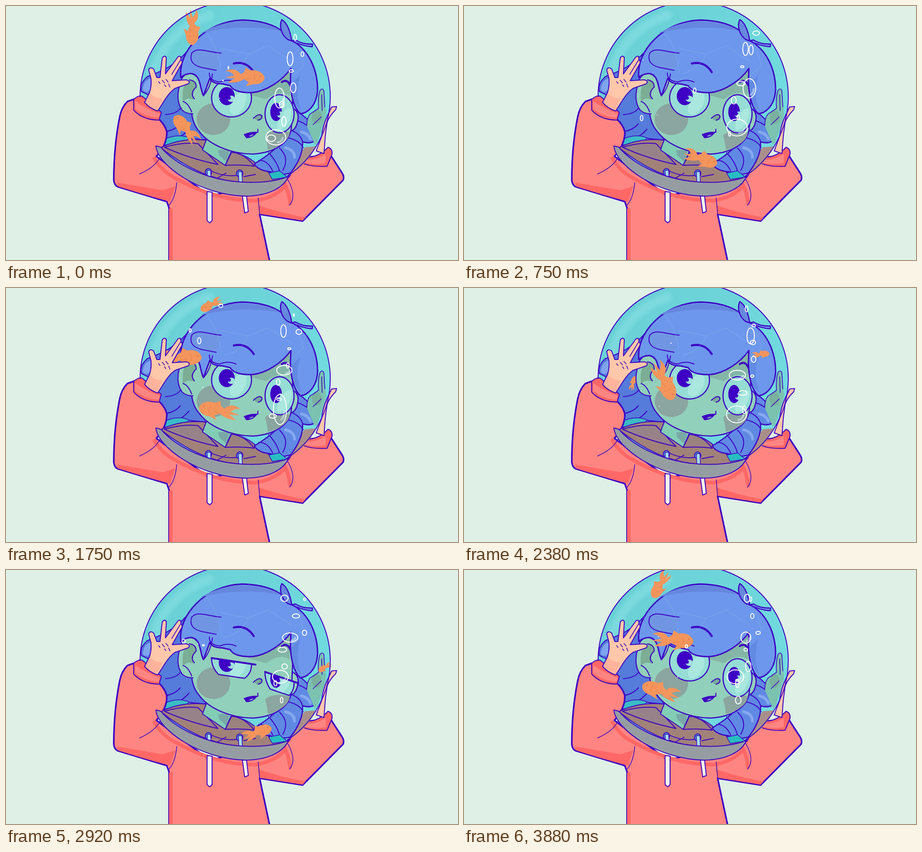
An HTML page with a canvas for the animation above (4000 ms loop, 998 by 561 pixels).

```html
<!DOCTYPE html>
<html lang="en">
<head>
<meta charset="utf-8">
<title>Fishbowl helmet</title>
<style>
  html, body { margin: 0; width: 100%; height: 100%; overflow: hidden; background: #dff0e6; }
  canvas { display: block; width: 100vw; height: 100vh; }
</style>
</head>
<body>
<canvas id="stage" width="998" height="561"></canvas>
<script>
const ctx = document.getElementById('stage').getContext('2d');
const LOOP = 4000, STEP = 125, FISH_STEPS = 16;
const INK = '#3d00c4', CORAL = '#ff8582', CORAL_DARK = '#ff6866', SKIN = '#ffc8aa';
const HAIR = '#6d97ec', HAIR_DARK = '#557bdb', FACE = '#91d0bb', BLUSH = '#8ba5a0', ORANGE = '#f4955c';

const clamp = (v, lo, hi) => Math.min(hi, Math.max(lo, v));
const mix = (a, b, k) => a + (b - a) * k;
const mod = (a, n) => ((a % n) + n) % n;
const random = seed => mod(Math.sin(seed * 12.9898) * 43758.5453, 1);

const paths = {};
function shape(d, fill, stroke, width = 2.5) {
  const p = paths[d] || (paths[d] = new Path2D(d));
  if (fill) { ctx.fillStyle = fill; ctx.fill(p); }
  if (stroke) { ctx.strokeStyle = stroke; ctx.lineWidth = width; ctx.stroke(p); }
}
const line = (d, width = 2, color = INK) => shape(d, null, color, width);

function oval(x, y, rx, ry, fill, stroke, width = 2, turn = 0) {
  ctx.beginPath();
  ctx.ellipse(x, y, rx, ry, turn, 0, Math.PI * 2);
  if (fill) { ctx.fillStyle = fill; ctx.fill(); }
  if (stroke) { ctx.strokeStyle = stroke; ctx.lineWidth = width; ctx.stroke(); }
}

function arc(radius, from, to, color, width) {
  ctx.beginPath();
  ctx.arc(506, 200, radius, from, to);
  ctx.strokeStyle = color;
  ctx.lineWidth = width;
  ctx.stroke();
}

// ---- character ----

function helmetBack() {
  const water = ctx.createLinearGradient(300, 60, 715, 300);
  water.addColorStop(0, '#69cfd5');
  water.addColorStop(1, '#72dce0');
  oval(506, 200, 210, 210, water);
  for (let i = 0; i < 4; i++) arc(188, 3.4, 4.4, 'rgba(160,235,232,.1)', 10 + i * 6);
}

function backHair() {
  shape('M400 100C365 140 330 148 312 156Q294 172 299 189L330 204L334 300Q375 304 400 292L440 296L430 190Z', HAIR_DARK, INK, 2);
  shape('M302 185Q304 163 320 160L318 185Q310 195 302 185Z', '#7ea4ee');
  line('M352 240Q377 238 385 226M346 278Q372 276 385 260M346 298Q380 300 404 272');
  shape('M346 296Q380 280 405 292L392 301L345 308Z', '#3bbcc5', INK, 1.5);
}

function sweater() {
  shape('M282 206L268 211Q255 224 251 245C242 290 238 340 238 385Q239 395 246 399L355 432L360 446L360 563L582 563L560 460L655 475L744 385Q748 377 741 367L717 330L650 335L622 378L450 420L332 332Q356 305 355 278Q352 264 338 250Z', CORAL, INK, 3.5);
  shape('M282 206Q296 194 303 201L343 235L338 252Q302 252 282 230Z', CORAL_DARK, INK, 2);
  shape('M285 210Q310 228 340 238L337 247Q307 245 285 227Z', CORAL);
  shape('M650 332Q685 340 711 312Q721 315 720 327L709 354Q667 356 650 344Z', CORAL_DARK, INK, 2);
  shape('M654 339Q685 343 706 326L706 347Q680 352 656 345Z', CORAL);
  shape('M246 390L346 407L374 398L362 432Q305 417 246 398Z', CORAL_DARK);
  shape('M556 440L575 446Q620 460 661 467L655 474L560 459Z', CORAL_DARK);
  line('M328 337Q346 366 370 378Q460 430 550 430Q590 424 612 402M364 450L364 561M612 386Q625 410 627 435', 8, CORAL_DARK);
  line('M295 371Q331 355 341 332M377 390Q374 425 359 441M557 424L560 460M622 383Q643 420 626 440M633 350Q632 376 620 382', 1.5);
  shape('M444 410L455 411L455 474L450 479L444 474Z', '#faf3e6', INK, 2);
  shape('M522 420L531 419L535 454L527 457Z', '#faf3e6', INK, 2);
}

function collar() {
  shape('M342 313Q385 291 440 296L484 352L498 323Q535 328 560 356Q585 374 622 376Q590 394 510 389Q425 380 342 313Z', '#a18279', INK, 2);
  shape('M350 312Q390 300 424 304L468 350Q405 337 350 312Z', '#98828a', INK, 2);
  shape('M443 294Q437 308 434 318L484 352L497 322L508 310Z', '#82cdb6', INK, 2);
  shape('M468 319L494 316L487 345L471 330Z', 'rgba(111,132,151,.5)');
  shape('M498 323L484 352Q525 350 548 354Q528 326 498 323Z', '#9b827f', INK, 2);
  line('M450 363Q480 378 509 374M465 381L486 369M525 377L551 372', 1.8);
  for (const [x, y] of [[447, 367], [516, 370]]) {
    oval(x, y, 7, 8, '#4aaebf', INK);
    shape(`M${x - 3} ${y - 4}l8 0l1 26l-8 -2Z`, '#a6dfe4', INK, 1.5);
  }
  shape('M331 309C334 351 426 418 530 420C579 419 613 402 624 376C598 388 554 392 510 388C440 382 374 350 342 312Z', '#969da2', INK, 2);
}

function sideHair() {
  shape('M622 376L632 345L660 312L684 310Q668 348 622 376Z', '#a98f8b');
  shape('M638 230C662 242 688 272 687 291Q679 307 655 300C656 325 643 350 628 369Q602 376 584 366Q558 364 548 349C586 325 625 299 638 230Z', '#6089e4', INK, 2.5);
  line('M639 252Q668 259 684 286M628 274Q650 282 655 300M622 291Q649 297 656 313M604 314Q627 336 611 363M580 324Q600 346 604 366M558 341Q578 340 589 365');
  line('M617 313Q637 318 637 334M652 278Q668 282 672 294', 6, '#85a9ef');
  shape('M580 369L604 364L621 378L588 383Z', '#28bdc1', INK, 1.5);
}

function face() {
  shape('M633 225Q646 233 645 248Q641 278 624 276Z', FACE, INK);
  shape('M420 175C404 211 406 253 426 276C448 307 498 327 545 327C594 324 626 302 630 270L636 140L450 145Z', FACE, INK);
  shape('M435 200C433 162 412 140 393 155C377 173 376 215 389 230Q398 240 414 238Z', FACE);
  shape('M396 168Q419 157 421 178Q409 190 414 207Q399 200 391 213Q387 188 396 168Z', '#7bae95');
  line('M432 175C422 146 398 140 387 163C376 195 378 215 389 230Q399 239 413 238M405 163Q420 165 420 179Q405 193 416 205M391 211Q402 214 410 234', 2.2);
  shape('M450 150L630 138L626 198Q604 183 574 206L538 196Z', 'rgba(119,157,145,.5)');
  oval(458, 250, 37, 35, BLUSH);
  shape('M572 286Q582 275 606 276L627 279Q623 306 578 318Q577 300 572 286Z', BLUSH);
  shape('M547 248Q557 234 566 241Q569 251 556 254Z', '#77aa9a');
  shape('M527 285Q541 278 553 280Q545 291 531 291Z', INK, INK, 2);
  line('M546 248Q560 235 565 243Q566 250 557 252M526 284Q540 278 556 279L556 272', 2.2);
  shape('M536 288Q541 283 547 284Q543 289 536 288Z', '#8194ca');
}

function hair() {
  shape('M386 158C379 100 440 34 520 31C580 32 612 50 630 76C668 95 688 140 688 185C686 222 664 237 650 238C634 225 628 190 628 165L629 138C610 165 575 188 545 191Q505 193 495 176L478 172Q455 172 450 160L436 198C428 185 431 150 408 149Q394 150 386 158Z', HAIR, INK, 3);
  shape('M430 60Q475 34 520 34Q583 36 607 55Q521 38 430 60Z', '#6687de');
  shape('M631 170L650 152Q637 198 652 230Q632 217 631 170Z', '#628ae3');
  shape('M475 104C443 102 424 89 410 104Q402 129 433 136L464 142Z', '#7096e3');
  line('M475 104C443 102 424 89 410 104Q402 129 433 136L464 142M449 148Q448 165 472 168Q490 160 508 168M437 197Q451 181 456 150');
  shape('M622 74C606 62 603 42 609 30Q625 40 631 77Z', '#6688dd', INK);
  shape('M631 77Q655 89 676 90L677 84Q655 85 639 75Z', HAIR, INK);
  line('M503 127Q531 121 547 146M609 168Q621 160 628 176', 4.5);
  line('M442 60Q472 93 474 145M474 94L535 106L578 88L631 122M535 106Q520 140 482 149M640 79L657 132L632 155', 2, 'rgba(139,199,239,.2)');
}

function rightHand() {
  shape('M685 320L697 288Q699 266 709 244L719 223L730 222L728 229Q713 244 709 257L705 287L702 326Z', SKIN, INK, 2);
  shape('M664 264Q665 239 677 235L690 226Q688 204 693 187Q699 179 702 188L704 223Q709 231 705 248L688 300L682 307Z', '#7bc2b1');
  oval(686, 245, 11, 15, 'rgba(120,150,130,.4)');
  line('M664 264Q665 239 677 235L690 226Q688 204 693 187Q699 179 702 188L704 223M697 196L698 231M678 262L696 245', 1.6);
}

function leftHand() {
  shape('M306 213L317 191Q322 175 320 160L315 141Q318 133 326 139L333 158L340 158L345 115Q350 107 354 114L352 150L380 112Q387 108 386 119Q392 123 386 131L367 165L398 163Q409 166 402 172L373 182Q362 190 352 205L335 232Q317 226 306 213Z', SKIN, INK, 2);
  shape('M318 192Q325 203 346 204L334 230Q315 222 308 213Z', '#ffb39c');
  line('M385 120L366 151M337 167L340 171M345 164L350 170M353 162L358 168M359 172L362 179M350 174L353 178', 1.6);
}

// ---- eyes: ellipses whose lids flatten and tilt ----

function squintAt(t) {
  const beat = Math.floor((t + 4) * 12 / 1000);
  return clamp(Math.min(beat - 30, 38 - beat) / 2.5, 0, 1);
}

function drawEye(x, y, rx, ry, tilt, squint) {
  const outline = new Path2D();
  const top = mix(-ry, -2, squint), bottom = mix(ry, 32, squint), skew = tilt * squint;
  for (let a = 0; a < Math.PI * 2; a += 0.05) {
    const dx = rx * Math.cos(a);
    outline.lineTo(x + dx, y + clamp(ry * Math.sin(a), top, bottom) + dx * skew);
  }
  outline.closePath();
  ctx.save();
  ctx.clip(outline);
  ctx.fillStyle = '#95ddd5';
  ctx.fill(outline);
  const px = x - rx * 0.24, py = y - 4 + 6 * squint, pr = rx * 0.4;
  oval(x + rx / 3, y + 12, rx / 3, 27, '#aae8df', null, 0, 0.5);
  oval(px, py, pr, 20, INK);
  oval(px + 10, py + 6, 8, 7, '#a0e1dc');
  oval(px + 5, py + 4, 4, 4, INK);
  ctx.restore();
  ctx.strokeStyle = INK;
  ctx.lineWidth = 2.5;
  ctx.stroke(outline);
  if (squint > 0.5) {
    ctx.lineWidth = 4;
    ctx.beginPath();
    ctx.moveTo(x - rx, y + top - rx * skew);
    ctx.lineTo(x + rx + 9, y + top + (rx + 9) * skew);
    ctx.stroke();
  }
}

// ---- fish: each swims a smooth route, one waypoint per three steps ----

const FISH = [
  { start: 13, front: [16, 26], route: [[440, 42], [412, 86], [462, 246], [559, 349], [625, 318]] },
  { start: 10, front: [14, 19], route: [[388, 104], [380, 146], [571, 158], [674, 144]] },
  { start: 23, front: [23, 32], route: [[690, 223], [581, 270], [462, 269], [372, 243], [378, 195]] }
];

function along(route, at) {
  const i = Math.min(Math.floor(at), route.length - 2), f = at - i;
  const point = n => route[clamp(n, 0, route.length - 1)];
  return [0, 1].map(axis => {
    const [a, b, c, d] = [-1, 0, 1, 2].map(n => point(i + n)[axis]);
    return b + f * ((c - a) + f * (2 * a - 5 * b + 4 * c - d + f * (3 * (b - c) + d - a))) / 2;
  });
}

function drawFish(tick, behind) {
  for (const { start, front, route } of FISH) {
    const span = (route.length - 1) * 3;
    const age = mod(tick - start, FISH_STEPS), step = start + age;
    if (age > span || behind === (step >= front[0] && step <= front[1])) continue;
    const at = age / 3;
    const [x, y] = along(route, at);
    const [ax, ay] = along(route, Math.max(0, at - 0.15));
    const [bx, by] = along(route, Math.min(span / 3, at + 0.15));
    const size = Math.sin(Math.PI * (age + 0.8) / (span + 1.6)) ** 0.6;
    ctx.save();
    ctx.translate(x, y);
    ctx.rotate(Math.atan2(by - ay, bx - ax));
    ctx.scale(size, size * (bx < ax ? -1 : 1));
    ctx.transform(1, 0.08 * Math.sin(step * 1.7), 0, 1, 0, 0);
    shape('M0 0C-4 -14 -20 -18 -33 -15L-44 -21L-48 -10L-56 -5C-65 -18 -79 -17 -92 -10C-80 -10 -76 -5 -71 -1L-92 4Q-77 7 -68 5L-87 16Q-64 18 -49 7L-37 13L-45 23L-26 17C-11 17 -1 10 0 0Z', ORANGE);
    oval(-10, -3, 1.8, 1.8, '#df7d50');
    line('M-25 -7Q-20 1 -25 9M-34 4L-47 7', 1.2, '#e6824f');
    ctx.restore();
  }
}

// ---- bubbles: seeded streams released at even intervals ----

function drawBubble(x, y, rx, ry) {
  if (rx < 2) return oval(x, y, rx, ry, '#fff');
  oval(x, y, rx, ry, null, '#fff', 2);
  if (rx < 10) return;
  ctx.beginPath();
  ctx.ellipse(x, y, rx * 0.7, ry * 0.7, 0, 0.1, 1.3);
  ctx.strokeStyle = 'rgba(235,247,255,.5)';
  ctx.lineWidth = 4;
  ctx.stroke();
}

function stream(now, { seed, count, life, x, spread, y, drop = 0, drift, size, shrink }) {
  for (let i = 0; i < count; i++) {
    const rand = k => random(seed + i * 7 + k);
    const age = mod(now - i * LOOP / count, LOOP);
    if (age > life) continue;
    const u = age / life;
    const r = mix(size[0], size[1], rand(1) ** 2) * (1 - shrink * u);
    const squash = 1 + 0.35 * Math.sin(age / 90 + rand(2) * 6);
    const left = x + spread * (rand(3) - 0.5) + drift * Math.sin(u * 1.5) * (0.6 + rand(4) * 0.8);
    drawBubble(left, y + drop * rand(5) - age * 0.26, r * squash, r / squash);
  }
}

function drawBubbles(now) {
  stream(now, { seed: 3, count: 12, life: 950, x: 594, spread: 14, y: 290, drift: 38, size: [18, 27], shrink: 0.65 });
  stream(now, { seed: 40, count: 28, life: 950, x: 596, spread: 36, y: 292, drift: 45, size: [3, 9], shrink: 0.2 });
  stream(now, { seed: 81, count: 40, life: 350, x: 450, spread: 120, y: 130, drop: 160, drift: 0, size: [1, 6], shrink: 0.3 });
}

// ---- frame ----

function draw(t) {
  const tick = Math.floor(t / STEP), squint = squintAt(t);
  ctx.fillStyle = '#dff0e6';
  ctx.fillRect(0, 0, 998, 561);
  ctx.lineCap = ctx.lineJoin = 'round';
  helmetBack();
  backHair();
  drawFish(tick, true);
  sweater();
  collar();
  sideHair();
  face();
  drawEye(498, 203, 44, 42, 0.15, squint);
  drawEye(604, 238, 32, 42, 0.34, squint);
  hair();
  rightHand();
  drawFish(tick, false);
  drawBubbles(tick * STEP);
  arc(210, Math.PI, 7.28, INK, 2);
  leftHand();
}

const began = performance.now();
function frame() {
  draw((performance.now() - began) % LOOP);
  requestAnimationFrame(frame);
}
frame();
</script>
</body>
</html>
```
